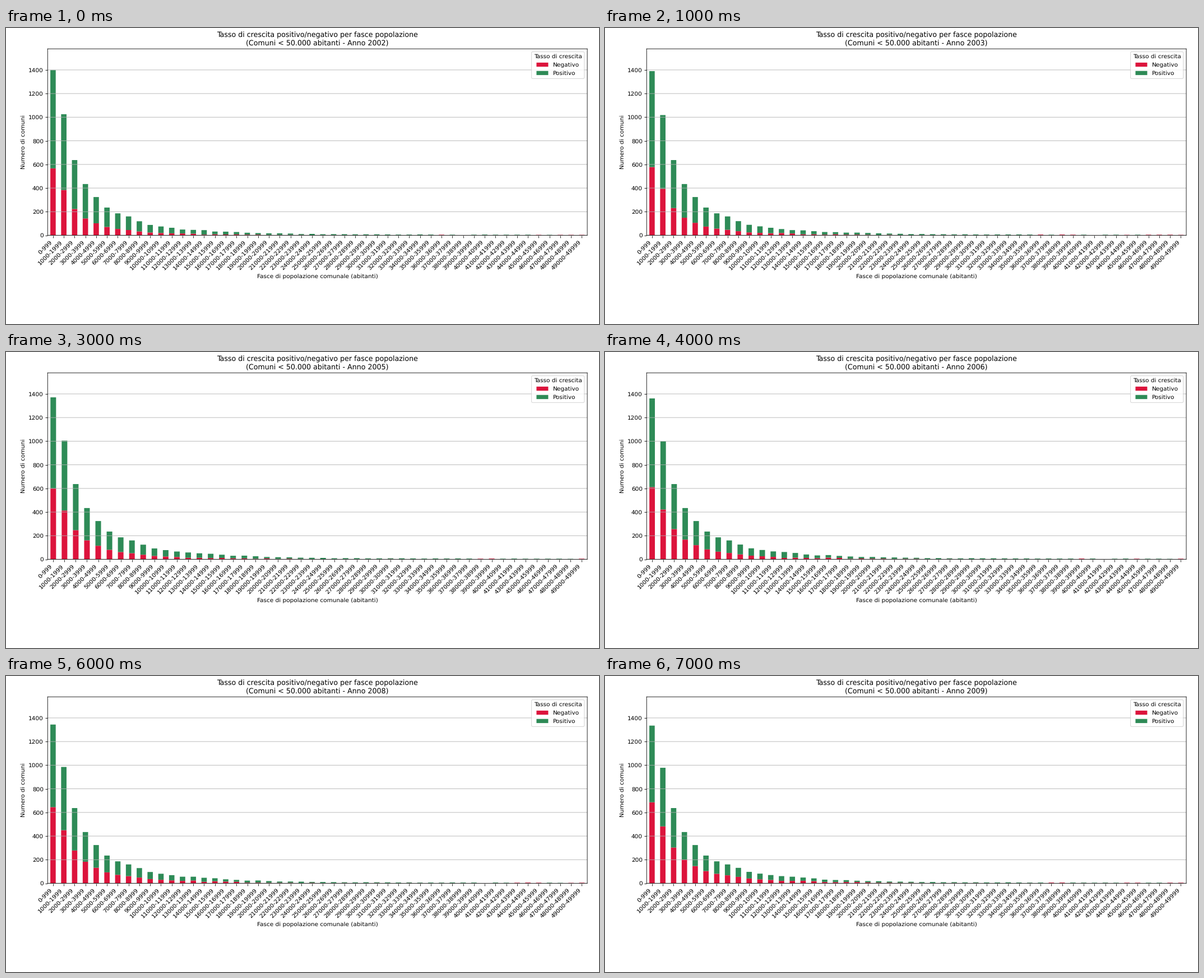
A matplotlib script that plays this animation: 1058x529 px, repeating every 8 s.

```python
import numpy as np
import matplotlib.pyplot as plt
from matplotlib.animation import FuncAnimation

plt.rcParams.update({"font.family": "DejaVu Sans", "text.hinting": "none", "path.snap": False})
DPI = 75.5714286
YEARS = 8
START = 2002
BANDS = np.arange(50)

# Key points of the population curve; bands between them follow a geometric decay
KEY_BANDS = [0, 1, 2, 3, 4, 5, 6, 7, 9, 12, 16, 20, 25, 35, 49]
KEY_TOWNS = [1399, 1025, 637, 434, 324, 235, 186, 160, 88, 54, 31, 18, 9.5, 6, 4.3]
CURVE = np.exp(np.interp(BANDS, KEY_BANDS, np.log(KEY_TOWNS)))
DRIFT = np.interp(BANDS, [1, 2, 7, 8], [-0.046, 0, 0, 0.1])

# Bands (in thousands) without any town in that year
ABSENT = {2004: [47], 2005: [42, 44], 2006: [46], 2007: [42]}


def lerp(a, b, t):
    return a + (b - a) * t


def counts(year):
    rng = np.random.default_rng(year)
    t = (year - START) / (YEARS - 1)
    wobble = rng.uniform(-1, 1, (2, len(BANDS))) * np.where(BANDS < 12, 0, 0.12)
    total = np.round(CURVE * (1 + DRIFT * t) * (1 + wobble[0]))

    # Decline spreads slowly, then jumps in the final year
    d = 0.7 * t + 0.3 * t**8
    share = lerp(0.24, 0.40, d) + lerp(0.165, 0.114, d) * np.exp(-BANDS / 5)
    neg = np.round(total * (share + wobble[1]))

    # The sparsest bands may be nearly empty or wholly shrinking
    luck = rng.random(len(BANDS))
    sparse = BANDS > 35
    total[sparse & (luck < 0.08)] = 1
    red = sparse & (luck > 0.8)
    red[-1] = True
    neg[red] = total[red]
    neg = np.minimum(neg, total)

    keep = np.setdiff1d(BANDS, ABSENT.get(year, []))
    return keep, neg[keep], total[keep] - neg[keep]


def band_label(b):
    return f"{b * 1000}-{b * 1000 + 999}" if b else "0-999"


fig, ax = plt.subplots(figsize=(14, 7), dpi=DPI)
fig.subplots_adjust(left=0.0702, right=0.9802, top=0.9296, bottom=0.2996)


def draw(i):
    year = START + i
    bands, neg, pos = counts(year)
    x = np.arange(len(bands))
    ax.clear()
    ax.bar(x, neg, 0.5, color="crimson", label="Negativo")
    ax.bar(x, pos, 0.5, bottom=neg, color="seagreen", label="Positivo")
    ax.set_xlim(-0.5, len(x) - 0.5)
    ax.set_ylim(0, 1578.5)
    ax.set_xticks(x, [band_label(b) for b in bands], rotation=45, ha="right")
    ax.grid(axis="y")
    ax.set_title("Tasso di crescita positivo/negativo per fasce popolazione\n"
                 f"(Comuni < 50.000 abitanti - Anno {year})")
    ax.set_xlabel("Fasce di popolazione comunale (abitanti)")
    ax.set_ylabel("Numero di comuni")
    ax.legend(title="Tasso di crescita", loc="upper right")
    return []


anim = FuncAnimation(fig, draw, frames=YEARS, interval=1000, repeat=True, repeat_delay=0)
plt.show()
```
